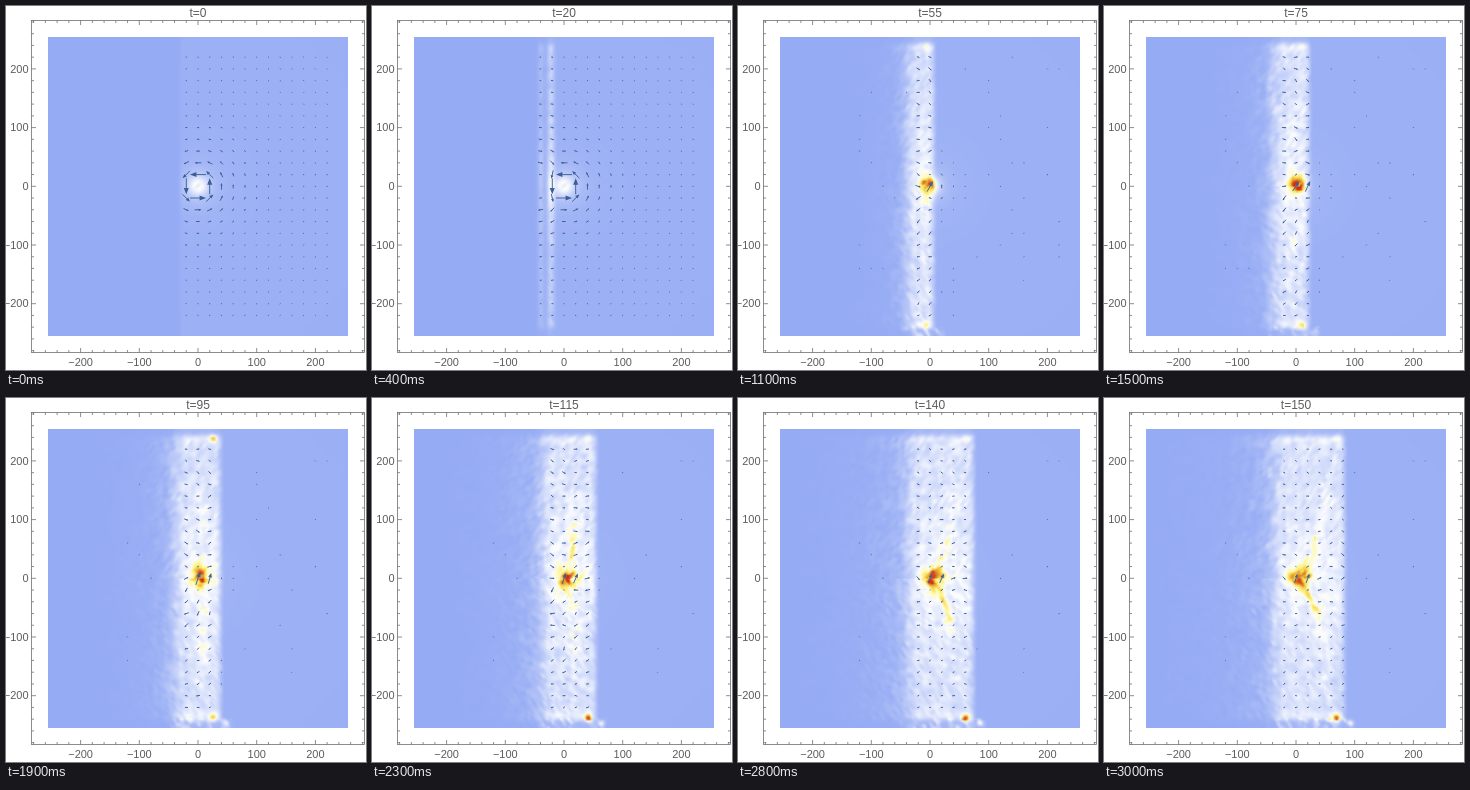
These frames come from a looping animation (360 by 364 pixels, 3.1 s). An HTML page with a canvas:

```html
<!DOCTYPE html>
<html lang="en">
<head>
<meta charset="utf-8">
<title>Vector field over a moving front</title>
<style>
html, body { margin: 0; width: 360px; height: 364px; overflow: hidden; background: #fff; }
#stage { position: relative; width: 360px; height: 364px; overflow: hidden; }
canvas { position: absolute; left: 42px; top: 31px; width: 300px; height: 299px; }
svg { position: absolute; left: 0; top: 0; }
text { font-family: "Liberation Sans", Arial, sans-serif; font-size: 11px; fill: #5c5c5c; }
#title { font-size: 12px; }
</style>
</head>
<body>
<div id="stage">
  <canvas id="heat" width="150" height="150"></canvas>
  <svg width="360" height="364" viewBox="0 0 360 364">
    <g id="axes" fill="none" stroke="#707070" stroke-width="0.8">
      <rect x="25.5" y="14.5" width="333" height="332"/>
    </g>
    <g id="labels"></g>
    <path id="arrows" fill="none" stroke="#3b5f98" stroke-width="0.95"/>
    <path id="heads" fill="#3b5f98"/>
    <text id="title" x="192" y="11" text-anchor="middle">t=0</text>
  </svg>
</div>
<script>
const CX = 192, CY = 180.3, K = 0.587, N = 150;
const STEP = 100, STEPS = 31;
const $ = id => document.getElementById(id);
const ctx = $("heat").getContext("2d");
const img = ctx.createImageData(N, N);

const clamp = (v, a = 0, b = 1) => Math.max(a, Math.min(b, v));
const smooth = (a, b, v) => { const q = clamp((v - a) / (b - a)); return q * q * (3 - 2 * q); };
const mix = (a, b, q) => a + (b - a) * q;
const bell = (v, w) => Math.exp(-(v / w) * (v / w));

function hash(x, y, z) {
  let h = Math.imul(x, 374761393) ^ Math.imul(y, 668265263) ^ Math.imul(z, 1274126177);
  h = Math.imul(h ^ (h >>> 13), 1103515245);
  h = Math.imul(h ^ (h >>> 15), 2246822519);
  return ((h ^ (h >>> 16)) >>> 0) / 4294967296;
}

function noise(x, y, z) {
  const i = Math.floor(x), j = Math.floor(y), k = Math.floor(z);
  const a = smooth(0, 1, x - i), b = smooth(0, 1, y - j), c = z - k;
  const layer = l => mix(
    mix(hash(i, j, l), hash(i + 1, j, l), a),
    mix(hash(i, j + 1, l), hash(i + 1, j + 1, l), a), b);
  return mix(layer(k), layer(k + 1), c);
}

// Blue, white, yellow, orange, red
const ramp = [
  [0, 149, 171, 244], [0.58, 252, 253, 255], [0.72, 255, 249, 165],
  [0.84, 247, 214, 70], [0.94, 224, 140, 42], [1.1, 206, 44, 24]
];

function paint(p, v) {
  let n = 1;
  while (n < ramp.length - 1 && v > ramp[n][0]) n++;
  const a = ramp[n - 1], b = ramp[n], q = clamp((v - a[0]) / (b[0] - a[0]));
  for (let c = 0; c < 3; c++) img.data[p + c] = mix(a[c + 1], b[c + 1], q);
  img.data[p + 3] = 255;
}

// Heat of the band left behind by the front
function wake(x, y, t, front) {
  const dx = x - CX, dy = y - CY, far = Math.abs(dy);
  const band = smooth(16, 50, t), late = smooth(45, 135, t);
  const lines = smooth(0, 18, t) * (1 - smooth(28, 50, t));
  const slant = dy > 0 ? -0.6 : 0.6;
  const n = noise((x + slant * y) / 3.6 + 90, (y - slant * x * 0.5) / 5.5 + 90, t / 13);
  const m = noise(x / 5, y / 15, t / 25 + 7);
  const tall = 1 - 0.8 * smooth(138, 147, far);
  const edge = 1 - smooth(front - 8, front + 2, x);
  const body = smooth(158, 184, x) * edge;
  const halo = x < 174 ? Math.exp((x - 174) / (5 + 0.15 * t)) : edge;

  let v = band * tall * body * (0.16 + 0.28 * n + 0.12 * m + 0.1 * bell(dy, 70) + 0.1 * bell(far - 139, 5));
  v += band * tall * halo * (1 - body) * 0.32 * n * (0.5 + m);
  v += lines * tall * (0.12 + 0.25 * n + 0.2 * bell(dy, 45)) * (0.45 * bell(x - 169, 3) + 0.9 * bell(x - 179, 3.5));

  // Hot ridge bending away from the centre, and the hot centre itself
  const bend = CX + (front - 19 - CX) * (1 - Math.exp(-far / 35));
  v += late * bell(x - bend, 6) * smooth(125, 45, far) * (0.08 + 0.34 * m * n);
  v += band * bell(dx - 9 * late, 9) * bell(dy, 9) * (0.08 + 0.3 * n);

  // Corners and the fringe along the lower rim
  const tip = 162 + 0.47 * t;
  v += band * bell(Math.hypot(x - tip, y - 40), 3.5) * (0.2 + 0.3 * bell(t - 95, 12));
  v += band * bell(Math.hypot(x - tip, y - 321), 4) * (0.3 + 0.3 * late);
  v += late * bell(Math.hypot(x - tip - 14, y - 326), 3) * 0.45;
  if (dy > 140) v += band * smooth(158, 175, x) * (1 - smooth(front, front + 14, x)) * 0.6 * Math.max(0, n - 0.4);
  return v;
}

function drawHeat(t) {
  const front = 172 + 0.47 * t;
  const core = 1 - 0.6 * smooth(35, 75, t);
  for (let j = 0; j < N; j++) {
    for (let i = 0; i < N; i++) {
      const x = 43 + 2 * i, y = 32 + 2 * j;
      const dx = x - CX, dy = y - CY, r = Math.hypot(dx, dy);
      const right = smooth(171, 177, x);
      let v = right * (0.025 + 1.3 / (r + 12)) * (x > front ? 1 : 0.6);
      v += core * (0.45 * bell(r, 9) + 0.12 * bell(r, 20) * right);
      v -= core * 0.3 * bell(dx + dy, 2.6) * bell(dx - dy, 5);
      if (t > 0) v += wake(x, y, t, front);
      paint(4 * (j * N + i), v);
    }
  }
  ctx.putImageData(img, 0, 0);
}

// Field vector in pixels, y upwards; null where nothing is shown.
function field(X, Y, t) {
  const r = Math.hypot(X, Y), front = -34 + 0.8 * t;
  const early = 1 - smooth(25, 50, t), a = X / 20 + 40, b = Y / 20 + 40;
  const swirl = r ? 16 * Math.pow(20 / r, 1.25) * (0.25 + 0.75 * early) / r : 0;
  let u = -Y * swirl, v = X * swirl;

  if (t < 40) {
    if (X < -40 || r === 0 || (X < -20 && t < 10)) return null;
    if (X < 0) {
      const push = smooth(3, 18, t) * early * (X < -20 ? 0.55 : 1) * clamp(Y / 40, -1, 1);
      if (X < -20) u = v = 0;
      u += push * (2 + 11 * Math.exp(-Math.abs(Y) / 90));
      v -= Math.abs(push) * 3 * Math.exp(-Math.abs(Y) / 60);
    }
    return [u, v];
  }
  if (X >= -20 && X < front - 4) {
    const z = t / 22;
    const len = (2.2 + 4 * noise(a * 0.8, b * 0.8, z + 9)) * (1 - 0.3 * smooth(115, 150, t)) * (0.75 + 0.5 * bell(Y, 110));
    const dir = (Y < 0 ? Math.PI + 0.35 : -0.15) + (noise(a * 0.7, b * 0.7, z) - 0.5) * 2.2;
    const lift = 14 * bell(Math.hypot(X - 8, Y), 14);
    return [u * 0.5 + len * Math.cos(dir), v * 0.5 + len * Math.sin(dir) + lift];
  }
  if (X >= front && r < 70) return [u, v];
  const share = X < -140 ? 0.012 : mix(0.12, 0.05, smooth(55, 115, t));
  return hash(a, b, 3) < mix(share, X < 0 ? share : 1, early) ? [u, v] : null;
}

function drawArrows(t) {
  let shaft = "", head = "";
  const f = n => n.toFixed(1);
  for (let X = -220; X <= 220; X += 20) {
    for (let Y = -220; Y <= 220; Y += 20) {
      const q = field(X, Y, t);
      if (!q) continue;
      const len = Math.hypot(q[0], q[1]) || 0.01, L = Math.max(len, 1.2);
      const c = q[0] / len, s = -q[1] / len;
      const x = CX + X * K, y = CY - Y * K;
      const tx = x + c * L / 2, ty = y + s * L / 2;
      shaft += `M${f(x - c * L / 2)} ${f(y - s * L / 2)}L${f(tx - c * L * 0.15)} ${f(ty - s * L * 0.15)}`;
      if (L > 2) {
        const w = L * 0.16, bx = tx - c * L * 0.4, by = ty - s * L * 0.4;
        head += `M${f(tx)} ${f(ty)}L${f(bx - s * w)} ${f(by + c * w)}L${f(bx + s * w)} ${f(by - c * w)}Z`;
      }
    }
  }
  $("arrows").setAttribute("d", shaft);
  $("heads").setAttribute("d", head);
}

function buildAxes() {
  let d = "", labels = "";
  for (let n = -280; n <= 280; n += 20) {
    const m = n % 100 ? 2.5 : 4.5, x = CX + n * K, y = CY - n * K;
    d += `M${x} 346.5v${-m}M${x} 14.5v${m}M25.5 ${y}h${m}M358.5 ${y}h${-m}`;
    if (n % 100 === 0) {
      const s = n < 0 ? "\u2212" + -n : n;
      labels += `<text x="${x}" y="359.5" text-anchor="middle">${s}</text>`;
      labels += `<text x="22.5" y="${y + 3.6}" text-anchor="end">${s}</text>`;
    }
  }
  $("axes").insertAdjacentHTML("beforeend", `<path d="${d}"/>`);
  $("labels").innerHTML = labels;
}

let shown = -1;
function render(ms) {
  const step = Math.floor(ms / STEP) % STEPS;
  if (step === shown) return;
  shown = step;
  const t = step * 5;
  $("title").textContent = "t=" + t;
  drawHeat(t);
  drawArrows(t);
}

buildAxes();
render(0);
const start = performance.now();
function tick() {
  render(performance.now() - start);
  requestAnimationFrame(tick);
}
requestAnimationFrame(tick);
</script>
</body>
</html>
```
